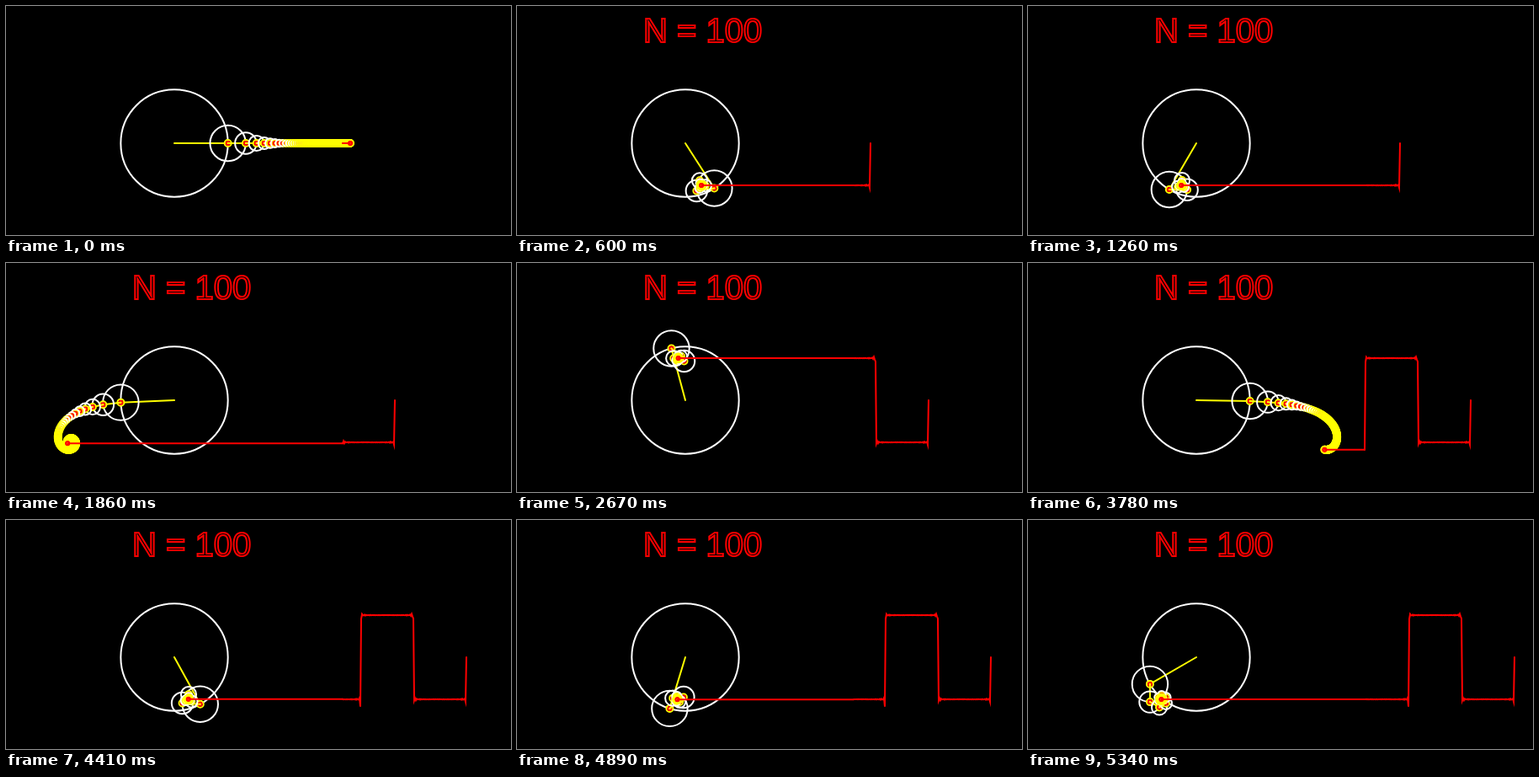
An HTML page with a canvas for the animation above (5370 ms loop, 600x272 px).

```html
<!DOCTYPE html>
<html lang="en">
<head>
<meta charset="utf-8">
<title>Square wave from rotating circles</title>
<style>
  html, body { margin: 0; width: 100%; height: 100%; overflow: hidden; background: #000; }
  canvas { display: block; }
</style>
</head>
<body>
<canvas id="stage" width="600" height="272"></canvas>
<script>
const ctx = document.getElementById('stage').getContext('2d');
const STEP_MS = 30, STEPS = 179, TURN = 0.05;
const TERMS = 100, AMPLITUDE = 50;
const CX = 200, CY = 163, WAVE_X = 400;
const WHITE = '#fff', YELLOW = '#ff0', RED = '#f00';

const radius = n => AMPLITUDE * 4 / (n * Math.PI);

// Height of the pen after a given number of steps.
function height(step) {
  let y = CY;
  for (let i = 0; i < TERMS; i++) {
    const n = 2 * i + 1;
    y += radius(n) * Math.sin(n * step * TURN);
  }
  return y;
}
const heights = Array.from({ length: STEPS }, (_, step) => height(step));

function circle(x, y, r, color) {
  ctx.strokeStyle = color;
  ctx.beginPath();
  ctx.arc(x, y, r, 0, 2 * Math.PI);
  ctx.stroke();
}

function line(x1, y1, x2, y2, color) {
  ctx.strokeStyle = color;
  ctx.beginPath();
  ctx.moveTo(x1, y1);
  ctx.lineTo(x2, y2);
  ctx.stroke();
}

function drawArms(step) {
  let x = CX, y = CY;
  for (let i = 0; i < TERMS; i++) {
    const n = 2 * i + 1, r = radius(n), angle = n * step * TURN;
    const px = x, py = y;
    x += r * Math.cos(angle);
    y += r * Math.sin(angle);
    circle(px, py, r, WHITE);
    line(px, py, x, y, YELLOW);
    circle(x, y, 4, YELLOW);
    circle(x, y, 2, RED);
  }
  return [x, y];
}

function drawWave(step) {
  ctx.strokeStyle = RED;
  ctx.beginPath();
  for (let i = 0; i <= step; i++) ctx.lineTo(WAVE_X + i, heights[step - i]);
  ctx.stroke();
}

function draw(step) {
  ctx.fillStyle = '#000';
  ctx.fillRect(0, 0, 600, 272);
  ctx.lineWidth = 2;
  ctx.lineCap = 'round';
  ctx.lineJoin = 'miter';
  // The label appears from the second step on.
  if (step > 0) {
    ctx.font = '40px "Liberation Sans", Arial, sans-serif';
    ctx.strokeStyle = RED;
    ctx.strokeText('N = ' + TERMS, 150, 43);
  }
  const [x, y] = drawArms(step);
  line(x, y, WAVE_X, heights[step], RED);
  drawWave(step);
}

const start = performance.now();
let shown = -1;
function tick() {
  const step = Math.floor((performance.now() - start) / STEP_MS) % STEPS;
  if (step !== shown) draw(shown = step);
  requestAnimationFrame(tick);
}
tick();
</script>
</body>
</html>
```
